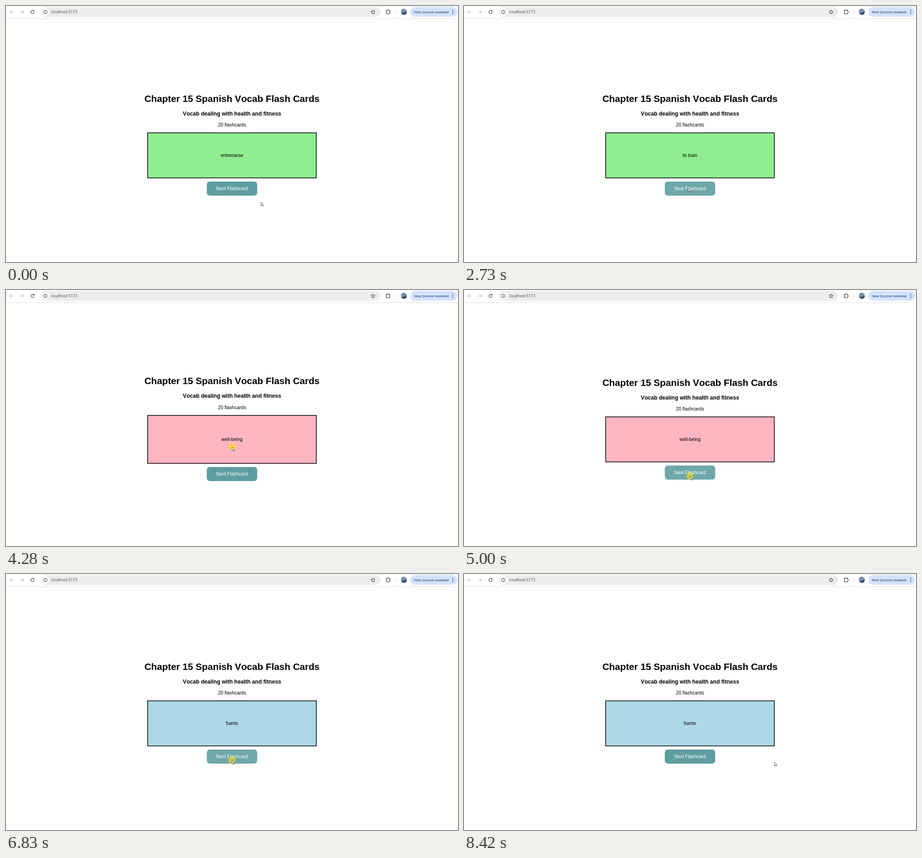
Recreate the animation shown at these times as an HTML page with a canvas. Size 995 by 563 pixels, loop 8.55 s.

```html
<!DOCTYPE html>
<html lang="en">
<head>
<meta charset="utf-8">
<title>Flash Cards</title>
<style>
html, body { margin: 0; width: 100%; height: 100%; overflow: hidden; background: #fff; }
canvas { display: block; }
</style>
</head>
<body>
<canvas id="stage" width="995" height="563"></canvas>
<script>
const ctx = document.getElementById('stage').getContext('2d');
const LOOP = 8550, STEPS = 60;
const LEAD = 22;               // ms by which steps start early
const ZOOM = 0.648;            // page px to stage px
const MID = 497.5;
const GROW = 3.24;             // card growth on each side when hovered
const SANS = '"Liberation Sans", Arial, sans-serif';
const UI = '"Open Sans", "Noto Sans", sans-serif';
const GREEN = '#90ee90', PINK = '#ffb6c1', BLUE = '#add8e6';
const CARD = { x: 311.1, y: 278.2, w: 372.7, h: 100.6 };
const BUTTON = { x: 442, y: 386, w: 111, h: 31 };

const train = { front: 'entrenarse', back: 'to train', color: GREEN };
const deck = [
  train,
  { front: 'el bienestar', back: 'well-being', color: PINK },
  train,
  { front: 'sufrir muchas presiones', color: GREEN },
  { front: 'fuerte', back: 'strong', color: BLUE }
];

// Where the pointer rests, in steps; a tap is [press, release]
const stops = [
  { x: 561, y: 431, from: 0, to: 0 },
  { x: 497, y: 404, from: 4, to: 7 },
  { x: 507, y: 333, from: 12, to: 14, taps: [[13, 14]] },
  { x: 493, y: 400, from: 18, to: 24, taps: [[20, 21]] },
  { x: 497.5, y: 345, from: 27, to: 31, taps: [[28, 28]] },
  { x: 497, y: 409, from: 34, to: 49, taps: [[35, 36], [39, 41], [47, 48]] },
  { x: 500.5, y: 346.5, from: 52, to: 56, taps: [[52, 54], [56, 57]] },
  { x: 683, y: 413, from: 59, to: STEPS }
];

const inside = (p, r) => p.x > r.x && p.x < r.x + r.w && p.y > r.y && p.y < r.y + r.h;
const smooth = u => u * u * (3 - 2 * u);

const taps = stops.flatMap(stop =>
  (stop.taps || []).map(([down, up]) => ({ down, up, next: inside(stop, BUTTON) })));

function pointerAt(step) {
  const i = stops.findLastIndex(stop => stop.from <= step);
  const a = stops[i], b = stops[i + 1];
  if (step <= a.to) return a;
  const u = smooth((step - a.to) / (b.from - a.to));
  return { x: a.x + (b.x - a.x) * u, y: a.y + (b.y - a.y) * u };
}

// Replays the taps and hovers up to a step; a flipped card grows afresh
function stateAt(step) {
  let index = 0, flipped = false, grown = 0;
  for (let s = 0; s <= step; s++) {
    const tap = taps.find(tap => tap.up === s);
    if (tap && tap.next) {
      index++;
      flipped = false;
    } else if (tap) {
      flipped = !flipped;
      grown = 0;
    }
    grown += inside(pointerAt(s), CARD) ? .5 : -.5;
    grown = Math.min(1, Math.max(0, grown));
  }
  const card = deck[index];
  return {
    word: flipped ? card.back : card.front,
    color: card.color,
    grow: grown * GROW,
    pressed: taps.some(({ down }) => step >= down && step < down + 3)
  };
}

function text(str, x, y, font, color = '#000', align = 'center') {
  ctx.font = font;
  ctx.fontKerning = 'none';
  ctx.fillStyle = color;
  ctx.textAlign = align;
  ctx.fillText(str, x, y);
}

function pill(x, y, w, h, r, color) {
  ctx.fillStyle = color;
  ctx.beginPath();
  ctx.roundRect(x, y, w, h, r);
  ctx.fill();
}

function disc(x, y, r, color) {
  ctx.fillStyle = color;
  ctx.beginPath();
  ctx.arc(x, y, r, 0, Math.PI * 2);
  ctx.fill();
}

function trace(d, x, y, color, width, fill) {
  const path = new Path2D(d);
  ctx.save();
  ctx.translate(x, y);
  ctx.lineJoin = 'round';
  if (fill) {
    ctx.fillStyle = fill;
    ctx.fill(path);
  }
  ctx.strokeStyle = color;
  ctx.lineWidth = width;
  ctx.stroke(path);
  ctx.restore();
}

function starPath(r) {
  let d = '';
  for (let i = 0; i < 10; i++) {
    const a = -Math.PI / 2 + i * Math.PI / 5, k = i % 2 ? r * .45 : r;
    d += (i ? 'L' : 'M') + k * Math.cos(a) + ' ' + k * Math.sin(a);
  }
  return d + 'Z';
}

function toolbar() {
  ctx.fillStyle = '#dcdcdc';
  ctx.fillRect(0, 27.3, 995, 1);

  trace('M4 0H-4M-.3-3.7L-4 0L-.3 3.7', 12, 13, '#a9a9a9', 1);
  trace('M-4 0H4M.3-3.7L4 0L.3 3.7', 35, 13, '#a9a9a9', 1);
  trace('M3.5 1A3.6 3.6 0 1 1 2.7-2.4', 58.5, 13, '#444', 1.2);
  trace('M3.7-4V-1.2H.9Z', 58.5, 13, '#444', .5, '#444');

  pill(76, 2, 748, 22, 11, '#eeedee');
  disc(86.5, 13, 8, '#fff');
  trace('M4 0A4 4 0 1 1-4 0A4 4 0 1 1 4 0', 86.5, 13, '#333', 1);
  trace('M0-.5V2.3M0-2.3V-1.2', 86.5, 13, '#333', 1);
  text('localhost:5173', 99.5, 16.2, '8.5px ' + UI, '#444', 'left');

  trace(starPath(4.8), 808, 13.4, '#333', 1);
  trace('M-4-3.6H-1.5A1.4 1.4 0 0 1 1.3-3.6H3.6V-1.1A1.4 1.4 0 0 1 3.6 1.7V4.2H-4V1.8A1.5 1.5 0 0 0-4-1.2Z',
    841, 13, '#333', 1.1);
  ctx.fillStyle = '#d3dcea';
  ctx.fillRect(857.5, 9, 1, 9);

  const photo = ctx.createLinearGradient(873, 6, 878, 20);
  photo.addColorStop(0, '#3b5872');
  photo.addColorStop(.42, '#86a9c4');
  photo.addColorStop(.65, '#46586a');
  photo.addColorStop(1, '#2d3843');
  disc(875.8, 12.9, 6.6, photo);

  pill(890, 2, 103, 21.6, 10.8, '#d3e3fd');
  text('New Quomel available', 898, 15.6, '7.4px ' + UI, '#1b2c4a', 'left');
  for (const dy of [-3.8, 0, 3.8]) disc(983.3, 13 + dy, 1, '#1b2c4a');
}

function page({ word, color, grow }, pointer) {
  const body = 16 * ZOOM + 'px ' + SANS;

  text('Chapter 15 Spanish Vocab Flash Cards', MID, 210.6 - grow, `bold ${32 * ZOOM}px ${SANS}`);
  text('Vocab dealing with health and fitness', MID, 240.6 - grow, `bold ${18.72 * ZOOM}px ${SANS}`);
  text('20 flashcards', MID, 264.9 - grow, body);

  const { x, y, w, h } = CARD, line = 1.5;
  ctx.fillStyle = '#000';
  ctx.fillRect(x, y - grow, w, h + 2 * grow);
  ctx.fillStyle = color;
  ctx.fillRect(x + line, y - grow + line, w - 2 * line, h + 2 * (grow - line));
  text(word, MID, 332.1, body);
  const half = ctx.measureText(word).width / 2;

  const b = { ...BUTTON, y: BUTTON.y + grow };
  pill(b.x, b.y, b.w, b.h, 10 * ZOOM, inside(pointer, b) ? '#6fa8aa' : '#5f9ea0');
  text('Next Flashcard', MID, 405.1 + grow, body, '#fff');
  return Math.abs(pointer.x - MID) < half && Math.abs(pointer.y - 329) < 7;
}

function draw(step) {
  const pointer = pointerAt(step), state = stateAt(step), { x, y } = pointer;
  ctx.fillStyle = '#fff';
  ctx.fillRect(0, 0, 995, 563);
  toolbar();
  const onWord = page(state, pointer);
  if (state.pressed) disc(x, y, 8, 'rgba(255,230,0,.58)');
  if (onWord) trace('M-1.8-4.4H1.8M0-4.4V4.4M-1.8 4.4H1.8', x, y, '#6b6b4a', .8);
  else trace('M.4.4V8.7L2.2 7L3.4 9.7L4.7 9.1L3.6 6.5H6Z', x, y, '#333', .75, '#fff');
}

function tick() {
  const t = performance.now() % LOOP;
  draw(Math.min(STEPS - 1, Math.floor((t + LEAD) / LOOP * STEPS)));
  requestAnimationFrame(tick);
}
tick();
</script>
</body>
</html>
```
